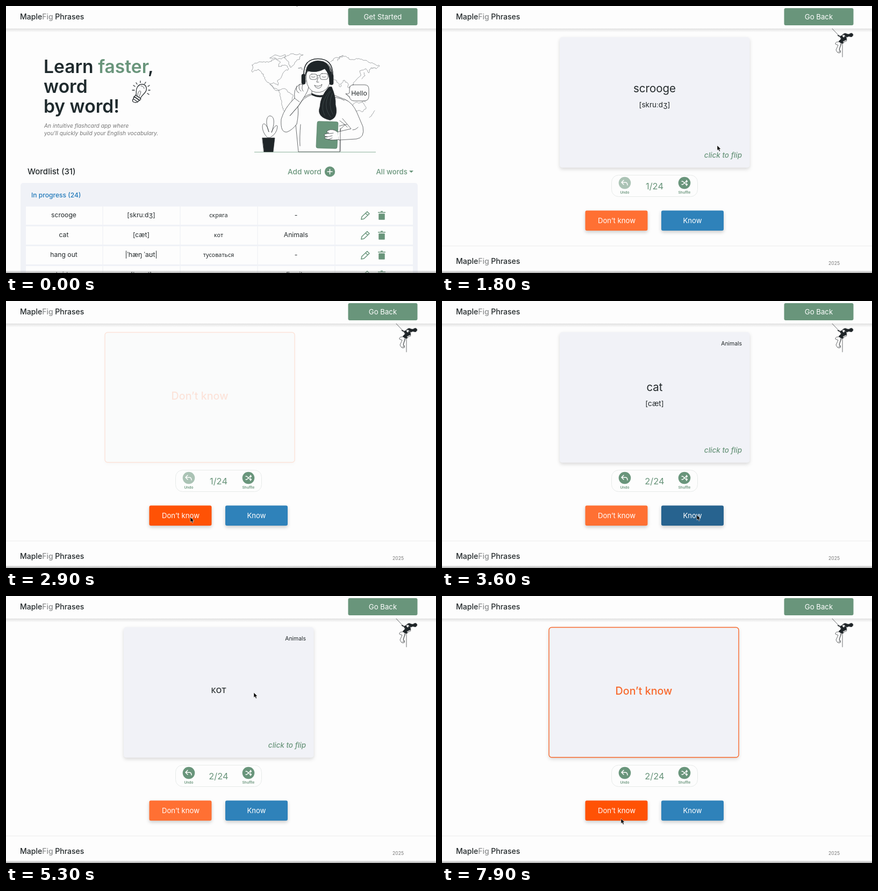
Write an HTML page that moves like this. It is 800 px wide and 498 px high and loops after 8000 ms.

```html
<!DOCTYPE html>
<html lang="en">
<head>
<meta charset="utf-8">
<title>Flashcards</title>
<style>
  html, body { margin: 0; width: 100%; height: 100%; overflow: hidden; background: #fdfdfd; }
  svg { display: block; width: 800px; height: 498px; font: 400 13.2px Inter, "Noto Sans", sans-serif; fill: #23292b; }
  .mid { text-anchor: middle; }
  .end { text-anchor: end; }
  .med { font-weight: 500; }
  .logo { font-size: 14px; font-weight: 500; }
  .title { font-size: 33.600px; font-weight: 600; fill: #1f2a2d; }
  .note { font-size: 10.250px; font-style: italic; fill: #777; }
  .tiny { font-size: 6.6px; font-weight: 600; }
  .cell { font-size: 12.2px; }
  .ru { font-family: "Noto Sans", sans-serif; font-size: 10.8px; }
  .green { fill: #69957b; }
  .white { fill: #fff; }
  .line { fill: none; stroke: #2b3033; stroke-width: .7; stroke-linecap: round; stroke-linejoin: round; }
  .skin { fill: #fdfdfd; }
  .dark { fill: #1f2528; }
  .icon { fill: none; stroke: #fff; stroke-width: 1.5; stroke-linecap: round; stroke-linejoin: round; }
  .raised { filter: drop-shadow(0 3px 3px #0003); }
  #body { filter: drop-shadow(0 3px 3px #00000024); }
</style>
</head>
<body>
<svg viewBox="0 0 800 498">
  <defs>
    <linearGradient id="shade" x2="0" y2="1">
      <stop stop-color="#000" stop-opacity=".11"/><stop offset="1" stop-color="#000" stop-opacity="0"/>
    </linearGradient>
    <linearGradient id="floor" x2="0" y2="1">
      <stop stop-color="#777" stop-opacity="0"/><stop offset="1" stop-color="#777" stop-opacity=".6"/>
    </linearGradient>
    <g id="brand" class="logo"><text>Maple<tspan fill="#8d8f90">Fig</tspan> Phrases</text></g>
    <g id="tools" fill="none" stroke="#69957b" stroke-width="1.5" stroke-linejoin="round">
      <path d="M661 398l1-5 10-9.500 4 4-10 9.500zM669 386.500l4 4"/>
      <path d="M694 388h10v10h-10z" fill="#69957b"/>
      <path d="M692 385h14M697 383.300h4"/>
    </g>
  </defs>

  <g id="home">
    <text class="title" x="70" y="125">Learn <tspan class="green">faster</tspan>,</text>
    <text class="title" x="70" y="162">word</text>
    <text class="title" x="70" y="199">by word!</text>
    <text class="note" x="71" y="226.500">An intuitive flashcard app where</text>
    <text class="note" x="71" y="241">you'll quickly build your English vocabulary.</text>

    <g class="line" style="stroke-width:1.3">
      <path d="M242 167C243 161 241 157 244 152C248 144 259 144 261 152C263 161 255 163 250 172Z"/>
      <path d="M241 166l10 7-2 3-10-7zM238 169l10 7-3 3-8-6zM237 173q-3 4 0 6 4 2 8 0"/>
      <path d="M245 167q0-7 4-9l2 2-3 9M251 149q5 0 6 5" style="stroke-width:.8"/>
      <path d="M250 143v-3M258 145l2-3M264 150l3-2M265 157h3M263 163l3 2M240 150l-3-2M239 157h-4M244 146l-2-3"/>
    </g>

    <g id="map" class="line" style="stroke:#6b6f72;stroke-width:.6"></g>
    <path d="M462 272.500H688" stroke="#8db39d" fill="none"/>
    <g class="line">
      <path class="skin" d="M486 245C474 233 476 217 481 220Q487 224 489 235C481 214 486 204 492 205C501 207 499 222 494 236C498 224 505 220 505 225Q504 238 492 245Z"/>
      <path class="dark" d="M477 246h23l-3 26h-17z"/>

      <path class="skin" d="M570 163Q551 168 543 184L539 221L544 272H621L622 230L630 222L655 214Q646 180 630 174L602 163Z"/>
      <path class="skin" d="M570 165Q553 170 546 184L528 205L543 188L557 166Q567 150 561 141Q556 137 552 147Q547 144 543 149Q535 155 537 172Q518 190 512 211Q510 237 523 235Q533 231 541 220"/>
      <path d="M537 172L546 179M541 149q-3 10 4 13M546 146q-3 9 3 13M552 147q-3 8 1 12M543 188q2 12-2 32M548 221q-2 24-1 40M605 170q20 0 29 10"/>
      <path class="skin" d="M630 174Q645 180 653 199L664 225Q668 246 652 248L619 250L616 235L642 229L626 210"/>
      <path d="M621 214q9 6 14 12M645 231q6 0 10-5M622 228v43M620 224l10-3"/>
      <path class="skin" d="M569 149V165Q584 174 599 164V143Z"/>
      <path class="skin" d="M559 124Q556 150 570 159Q584 165 596 155Q606 145 603 122Q584 108 559 124Z"/>
      <path class="dark" d="M569 163Q584 171 599 163V166Q585 174 569 166Z"/>
      <path class="dark" d="M557 130Q555 105 579 102Q606 101 607 131L602 142Q602 127 593 117Q577 126 561 121Z"/>
      <path class="dark" d="M601 151Q585 168 584 188Q577 207 603 213Q619 208 613 184Q614 170 606 151Z"/>
      <path d="M604 159q-17 26 0 48M607 163q-9 21 1 39M602 159q-20 24-9 45" style="stroke:#677;stroke-width:.4"/>
      <path d="M554 129Q553 99 580 98.500Q608 98 608 129" style="stroke-width:1.6"/>
      <path d="M557 124Q559 102 581 101Q602 102 604 122" style="stroke:#fff;stroke-width:.8"/>
      <rect class="dark" x="550" y="127" width="7" height="19" rx="3"/>
      <rect class="dark" x="602" y="127" width="7" height="20" rx="3"/>
      <rect x="565" y="127" width="14" height="10" rx="4"/><rect x="584" y="126" width="15" height="11" rx="4"/>
      <path d="M579 130q3-2 5 0M568 132q4 2 7 0M588 132q4 2 7 0M581 133l-3 9h4M574 148q8 4 14-2q-2 9-9 7q-4-1-5-5"/>
      <path d="M579 218q0-3 3-3l33 1q3 0 3 3l-2 44q0 3-3 3l-33-1q-3 0-3-3z" fill="#69957b" style="stroke:#557d66"/>
      <path class="skin" d="M619 249Q607 251 600 249L593 247Q592 244 598 244Q590 243 593 239L601 237Q594 236 599 232Q608 228 617 235"/>
      <path d="M598 244l9-2M601 238l8-1M600 249l7-3"/>
      <path class="skin" d="M646 147h21q8 0 8 8v13q0 9-9 9h-18q-8 0-9-8l-7-5q5 1 7-2v-6q0-9 7-9z"/>
    </g>
    <text class="mid" x="657" y="167" font-size="12.200">Hello</text>

    <text class="med" x="40" y="314" font-size="15">Wordlist (31)</text>
    <text class="med green" x="524" y="314" font-size="13.600">Add word</text>
    <circle class="green" cx="602.500" cy="309" r="9.700"/>
    <path class="icon" d="M598 309h9M602.500 304.500v9"/>
    <text class="med green" x="688.500" y="314">All words</text>
    <path class="green" d="M750 307h8l-4 4z"/>
    <rect x="27" y="330" width="739" height="180" rx="5" fill="#f0f2f7"/>
    <text class="med" x="47" y="357" font-size="12.100" fill="#2079ba">In progress (24)</text>
    <g id="rows"></g>
  </g>

  <g id="study">
    <g class="line">
      <path d="M720 36L740 57L745 67V95"/>
      <path class="skin" d="M740 67Q731 66 732 71L737 73L733 82L736 87L742 84L739 81L743 71Z"/>
      <path d="M742 70l-3 13 3 3-4 2"/>
      <path class="dark" d="M736 55l3 2 5-2q5 0 8 3l1 5-5 3-2 4q-5-1-8-4l5-5-4-6z"/>
      <path class="dark" d="M745 54q4-5 8-2q4 2 7-1q4-1 5 3q-2 5-6 3q-3-1-5 1q-3 0-4-3z"/>
      <path class="skin" d="M745 54q4-1 5 1l-2 4q-4-1-3-5zM746 66l6-3 1 2-7 3z"/>
    </g>
    <g id="card">
      <g id="body">
        <rect x="219" y="58" width="353.500" height="243.500" rx="5" fill="#f1f2f7"/>
        <text id="topic" class="end" x="558" y="83" font-size="10.400"></text>
        <text id="word" class="mid" x="395.500" font-size="20.500"></text>
        <text id="sound" class="mid" x="395.500" font-size="13.500"></text>
        <text id="meaning" class="mid med" x="395.500" y="181" style="font:500 18px 'Noto Sans',sans-serif">кот</text>
        <text class="end med green" x="558" y="283" font-size="13.500" font-style="italic">click to flip</text>
      </g>
      <g id="verdict">
        <rect x="219" y="58.500" width="353" height="242.500" rx="5" fill="#f1f2f7" stroke="#f8692d" stroke-width="1.400"/>
        <text class="mid med" x="395.500" y="183.500" font-size="19.700" fill="#f8692d">Don’t know</text>
      </g>
    </g>

    <rect x="315.500" y="315.500" width="160" height="40" rx="13" fill="#fdfdfd" stroke="#e7eae9"/>
    <g id="undo">
      <circle class="green" cx="340" cy="330" r="11.300"/>
      <path class="icon" d="M338 325l-4 4 4 4M335 329h6q4 0 4 5"/>
    </g>
    <text class="tiny mid green" x="340" y="349.500">Undo</text>
    <text id="count" class="mid green" x="395.500" y="341.500" font-size="16.500"></text>
    <circle class="green" cx="451" cy="330" r="11.300"/>
    <path class="icon" d="M446 327h2l6 6h2M446 333h2l6-6h2M454.500 325l2 2-2 2M454.500 331l2 2-2 2" style="stroke-width:1.3"/>
    <text class="tiny mid green" x="451" y="349.500">Shuffle</text>

    <g class="raised">
      <rect id="no" x="266.500" y="381.500" width="116" height="37.500" rx="3"/>
      <rect id="yes" x="408" y="381.500" width="116" height="37.500" rx="3"/>
    </g>
    <text class="mid white" x="325" y="405">Don’t know</text>
    <text class="mid white" x="466" y="405">Know</text>

    <path d="M0 447.500H800" stroke="#ececec"/>
    <use href="#brand" x="26" y="481"/>
    <text x="719" y="483" font-size="8.600" fill="#777">2025</text>
  </g>

  <rect y="42" width="800" height="7" fill="url(#shade)"/>
  <rect width="800" height="42" fill="#fdfdfd"/>
  <use href="#brand" x="26" y="25"/>
  <rect id="nav" x="636.500" y="4" width="129" height="32" rx="3"/>
  <text id="navText" class="mid white" x="701" y="25"></text>
  <rect y="493" width="800" height="5" fill="url(#floor)"/>
  <path id="cursor" d="M0 0V9.500L2.200 7.600L3.800 11.200L5.500 10.400L4 7H6.800Z" fill="#000" stroke="#fff" stroke-width=".6"/>
</svg>

<script>
const $ = id => document.getElementById(id);
const clamp = v => Math.max(0, Math.min(1, v));
const ease = v => { v = clamp(v); return v * v * (3 - 2 * v); };
const LOOP = 8000, OPEN = 920, NEXT = 2960;
const SWIPES = [2480, 7660], FLIPS = [4600, 5800], FLIP_TIME = 600;

// Cursor stops: time, x, y
const PATH = [
  [0, 537, -10], [650, 702, 22], [950, 702, 22], [1700, 512, 260], [1850, 512, 260],
  [2380, 343, 403], [3000, 343, 403], [3500, 474, 399], [3700, 474, 399],
  [4400, 461, 180], [6700, 461, 180], [7500, 333, 415], [8000, 333, 415]
];

// Jagged coastlines grown from a few corner points
let seed = 7;
const jitter = () => (seed = seed * 16807 % 2147483647) / 2147483647 - .5;
function coast(corners) {
  const p = corners.split(' ').map(s => s.split(',').map(Number));
  let d = 'M' + p[0];
  for (let i = 1; i < p.length; i++) {
    const [a, b] = [p[i - 1], p[i]];
    const n = Math.ceil(Math.hypot(b[0] - a[0], b[1] - a[1]) / 3);
    for (let k = 1; k <= n; k++)
      d += 'L' + [0, 1].map(j => (a[j] + (b[j] - a[j]) * k / n + (k < n ? jitter() * 3 : 0)).toFixed(1));
  }
  return `<path d="${d}"/>`;
}
$('map').innerHTML = [
  '458,110 471,104 488,105 500,98 510,104 507,113 519,110 526,117 517,123 512,133 505,139 506,148 498,143 491,146 500,156 508,157 498,153 486,142 479,127 470,118 458,123 458,110',
  '491,97 500,91 511,94 520,91 512,99 491,97',
  '518,96 532,89 553,91 544,100 537,106 530,115 525,103 518,96',
  '508,157 518,154 534,166 532,176 523,188 520,201 514,190 511,174 508,157',
  '604,104 616,96 630,94 641,100 657,98 675,105 695,112 688,117 679,115 675,125 670,117 658,121 660,130 652,137 646,147 638,153 634,142 627,139 622,151 615,139 606,134',
  '642,186 650,180 657,181 663,178 670,189 664,197 655,195 646,196 642,186',
  '632,163 637,169 643,171', '650,171 660,174 669,179', '662,136 668,130 666,124',
  '676,208 681,202 686,195', '544,116 549,114 551,119 544,116', '617,102 621,95 627,92'
].map(coast).join('');

const words = [
  ['scrooge', '[skruːdʒ]', 'скряга', '-'],
  ['cat', '[cæt]', 'кот', 'Animals'],
  ['hang out', '|ˈhæŋ ˈaʊt|', 'тусоваться', '-'],
  ['bride', '[braɪd]', 'невеста', 'Family']
];
$('rows').innerHTML = words.map((w, i) => {
  const y = 374 + i * 37;
  return `<rect x="37" y="${y}" width="720" height="34" fill="#fdfdfd"/>` +
    [180, 324, 468, 612].map(x => `<path d="M${x} ${y}v34" stroke="#eceef3"/>`).join('') +
    w.map((s, k) => `<text class="mid ${k == 2 ? 'ru' : 'cell'}" x="${107.5 + k * 144}" y="${y + 20}">${s}</text>`).join('') +
    `<use href="#tools" y="${i * 37}"/>`;
}).join('');

function cursorAt(t) {
  const i = PATH.findIndex(p => p[0] > t);
  const [a, b] = [PATH[i - 1], PATH[i]];
  const k = ease((t - a[0]) / (b[0] - a[0]));
  return [a[1] + (b[1] - a[1]) * k, a[2] + (b[2] - a[2]) * k];
}

function paint(id, [x, y], base, hover) {
  const r = $(id), v = name => +r.getAttribute(name);
  const over = x >= v('x') && x <= v('x') + v('width') && y >= v('y') && y <= v('y') + v('height');
  r.style.fill = over ? hover : base;
}

const show = (id, on) => $(id).style.display = on ? '' : 'none';

function draw(t) {
  const home = t < OPEN, n = t < NEXT ? 0 : 1;
  const [word, sound, , topic] = words[n];
  show('home', home);
  show('study', !home);
  $('navText').textContent = home ? 'Get Started' : 'Go Back';

  const pos = cursorAt(t);
  $('cursor').setAttribute('transform', `translate(${pos})`);
  paint('nav', pos, '#69957b', '#557d66');
  paint('no', pos, '#ff7033', '#ff5205');
  paint('yes', pos, '#2f82ba', '#27638f');

  $('word').textContent = word;
  $('word').setAttribute('y', 161 + n * 7);
  $('sound').textContent = sound;
  $('sound').setAttribute('y', 189 + n * 7);
  $('topic').textContent = n ? topic : '';
  $('count').textContent = `${n + 1}/24`;
  $('undo').style.opacity = n ? 1 : .55;

  // The card turns about its middle, half a turn per flip
  const turn = FLIPS.reduce((sum, f) => sum + ease((t - f) / FLIP_TIME), 0);
  const c = Math.cos(turn * Math.PI), back = c < 0;
  $('body').setAttribute('transform', `translate(395.5 0) scale(${Math.abs(c)} 1) translate(-395.5 0)`);
  show('word', !back);
  show('sound', !back);
  show('meaning', back);

  const start = SWIPES[n], swiping = t >= start;
  const slide = swiping ? (t - start) * .083 : 0;
  show('verdict', swiping);
  show('body', !swiping);
  $('card').setAttribute('transform', `translate(${-slide} 0)`);
  $('card').style.opacity = 1 - clamp((slide - 20) / 18);
  $('card').style.filter = swiping ? 'drop-shadow(0 3px 3px #0002)' : '';
}

const begin = performance.now();
function tick() {
  draw((performance.now() - begin) % LOOP);
  requestAnimationFrame(tick);
}
tick();
</script>
</body>
</html>
```
